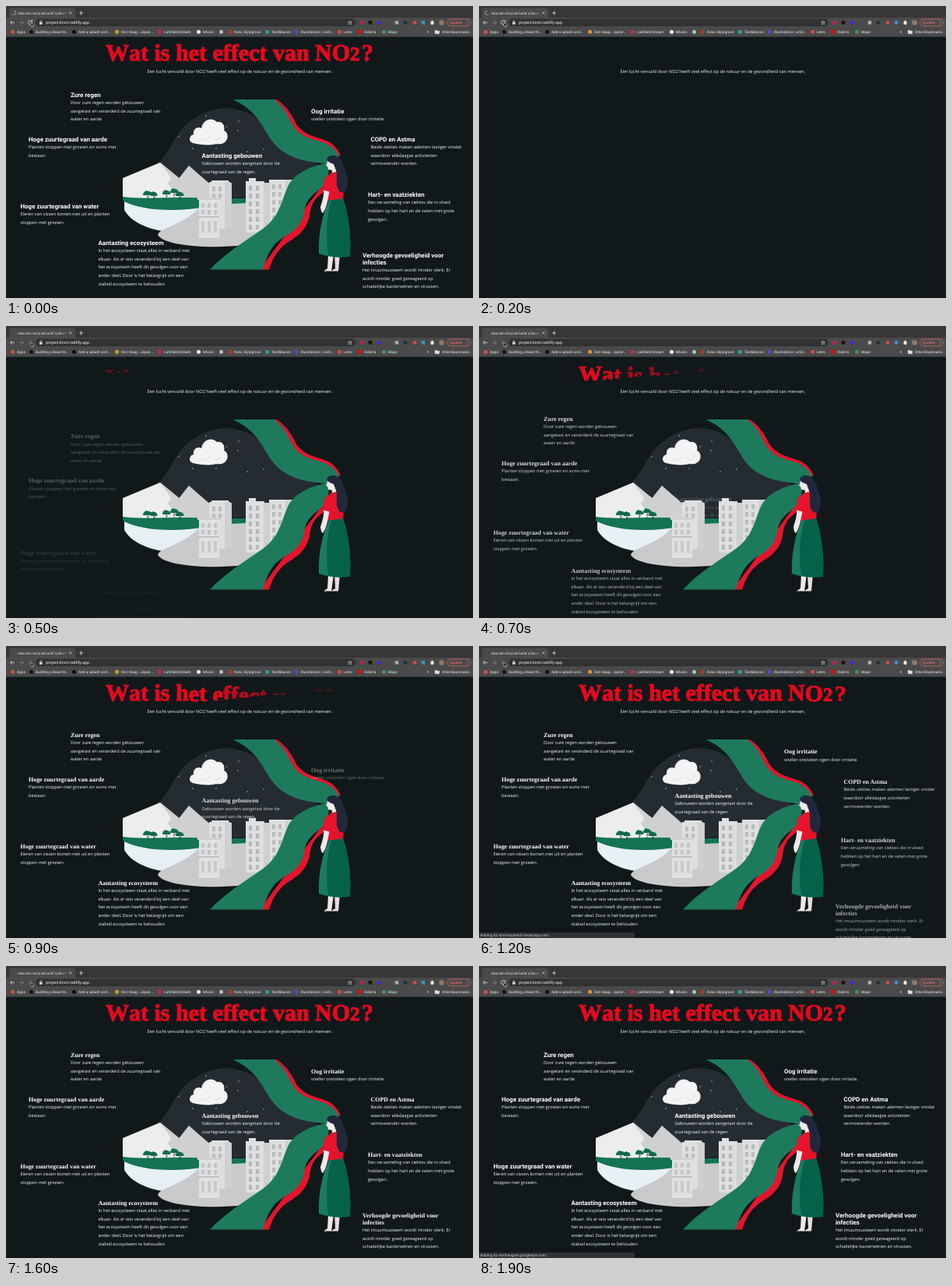
These frames come from a looping animation (600x375 px, 2 s). An HTML page with a canvas:

```html
<!DOCTYPE html>
<html lang="nl">
<head>
<meta charset="utf-8">
<title>NO2</title>
<style>
html, body { margin: 0; width: 100%; height: 100%; overflow: hidden; background: #10181a; }
canvas { display: block; width: 600px; height: 375px; }
</style>
</head>
<body>
<canvas id="stage" width="600" height="375"></canvas>
<script>
const ctx = document.getElementById('stage').getContext('2d');
const LOOP = 2000, STEP = 100;
const UI = 'Roboto, sans-serif';
const BODY = '5.68px "Open Sans", sans-serif';
const SERIF = '"Liberation Serif", serif';
const GREEN = '#1d7a5d', RED = '#e4142c', PAGE = '#10181a';

const clamp = v => Math.max(0, Math.min(1, v));

function text(s, x, y, font, color) {
  ctx.font = font;
  ctx.fillStyle = color;
  ctx.fillText(s, x, y);
}
function rect(x, y, w, h, color, r = 0) {
  ctx.fillStyle = color;
  ctx.beginPath();
  ctx.roundRect(x, y, w, h, r);
  ctx.fill();
}
function dot(x, y, r, color) {
  ctx.fillStyle = color;
  ctx.beginPath();
  ctx.arc(x, y, r, 0, Math.PI * 2);
  ctx.fill();
}
function shape(d, color) {
  ctx.fillStyle = color;
  ctx.fill(new Path2D(d));
}
function line(d, color, width = 0.8) {
  ctx.strokeStyle = color;
  ctx.lineWidth = width;
  ctx.stroke(new Path2D(d));
}

// Browser chrome

const bookmarks = [
  ['Apps', 14, '#d0533f'], ['Building a React N...', 38, '#111'], ['Add a splash scre...', 93, '#111'],
  ['Den Haag - Japan...', 148, '#d99a2b'], ['Larkfield Stream', 203, '#c42b54'], ['Mivolo', 253, '#f1f1f1'],
  ['', 282, '#bbb'], ['Kata | Bytegrove', 293, '#b1361e'], ['TestBeacon', 341, '#20a7a0'],
  ['Illustrations | unDr...', 379, '#4a4bd0'], ['Letro', 434, '#d94b3d'], ['Vidorra', 460, '#f00'],
  ['Maps', 491, '#3c9a55']
];
const extensions = [
  [457, '#c3243b'], [468, '#151515'], [479, '#3730c8'], [502, '#a8a8a8'],
  [513, '#2b3033'], [525, '#c74a50'], [536, '#3f8fc4']
];

function drawReload(loading) {
  if (loading) {
    line('M29 19l4 4M33 19l-4 4', '#777');
  } else {
    line('M33 19.5a2.6 2.6 0 1 0 .6 2M33.7 18v2h-2', '#ddd');
  }
  const hand = 'M32 21.2l.1 5.2 1.2-1 .9 1.9 1-.5-.9-1.8 1.6-.2z';
  shape(hand, '#000');
  line(hand, '#eee', 0.5);
}

function drawChrome(t) {
  rect(0, 0, 600, 16, '#373738');
  rect(4, 2.5, 85, 14, '#4a4a4b', 3);
  rect(0, 15, 600, 24.5, '#4a4a4b');
  if (t < 300) {
    ctx.strokeStyle = '#bbb';
    ctx.lineWidth = 0.8;
    ctx.beginPath();
    const a = t / 90;
    ctx.arc(10.3, 8.8, 2.4, a - 1.5, a + 2.6);
    ctx.stroke();
  }
  const fade = ctx.createLinearGradient(70, 0, 79, 0);
  fade.addColorStop(0, '#eee');
  fade.addColorStop(1, '#4a4a4b');
  text('Hoe een virus de lucht schone', 15.5, 10.6, '4.7px ' + UI, fade);
  line('M81.3 7.4l3 3M84.3 7.4l-3 3', '#ddd', 0.7);
  line('M94 9h5M96.5 6.5v5', '#ddd', 0.8);

  line('M11 21.3H5.8M8 19l-2.3 2.3L8 23.6', '#ddd');
  line('M17 21.3h5.2M20 19l2.3 2.3-2.3 2.3', '#888');
  rect(38, 16.5, 411, 9.6, '#303133', 4.8);
  rect(43, 20.6, 3.6, 3, '#ddd');
  line('M43.8 20.7v-1a1 1 0 0 1 2 0v1', '#ddd', 0.6);
  text('project-knmi.netlify.app', 51, 23.2, '5.4px ' + UI, '#f0f0f0');
  line('M442 18.8l.7 1.7 1.9.1-1.5 1.2.5 1.8-1.6-1-1.6 1 .5-1.8-1.5-1.2 1.9-.1z', '#ddd', 0.6);
  for (const [x, c] of extensions) rect(x - 2.3, 19, 4.6, 4.6, c, 1);
  dot(490.5, 21.3, 2.2, '#494d57');
  rect(545.6, 19.8, 4, 4, '#eee', 0.7);
  dot(547.6, 19.5, 1, '#eee');
  dot(559.7, 21.3, 3.4, '#8c7a6b');
  ctx.strokeStyle = '#e2665c';
  ctx.lineWidth = 0.7;
  ctx.beginPath();
  ctx.roundRect(566.5, 16.8, 30, 9, 4.5);
  ctx.stroke();
  text('Update', 570, 23.1, '5px ' + UI, '#ef7469');
  for (const y of [19.3, 21.3, 23.3]) dot(592.5, y, 0.55, '#ef7469');

  for (const [name, x, c] of bookmarks) {
    dot(x - 5.5, 33.3, 2.5, c);
    text(name, x, 35.2, '4.75px ' + UI, '#eee');
  }
  text('»', 540.5, 35, '6px ' + UI, '#eee');
  shape('M551 31h2.2l.7.8h3v4H551z', '#ddd');
  text('Other Bookmarks', 560, 35.2, '4.6px ' + UI, '#eee');
  drawReload(t >= 300 && t < 1700);
}

// Illustration

const stars = [[257, 141], [222, 168], [240, 183], [270, 183], [284, 155], [298, 160], [310, 187], [331, 184], [299, 148]];

function tree(x, y, w) {
  line(`M${x} ${y}v7M${x} ${y + 4}l2-2`, '#12372f', 0.7);
  shape(`M${x - w} ${y + 1}C${x - w} ${y - 3} ${x - 2} ${y - 6} ${x + 1} ${y - 4}` +
    `C${x + w} ${y - 4} ${x + w + 1} ${y} ${x + w} ${y + 1}Z`, '#0f6b4e');
}

function windows(x, y, cols, rows, dx, dy, w, h, color) {
  for (let r = 0; r < rows; r++)
    for (let c = 0; c < cols; c++) rect(x + c * dx, y + r * dy, w, h, color);
}

function drawTown() {
  shape('M195 294C197 284 232 281 250 256L372 250L340 300C300 314 205 312 195 294Z', '#c9cacb');

  rect(338, 223, 30, 58, '#dedfdf');
  rect(359, 223, 9, 58, '#cfd0d1');
  windows(342, 229, 2, 5, 8, 10, 4, 6, '#b9bbbd');
  rect(308, 225, 24, 66, '#dedfdf');
  rect(312, 221, 9, 5, '#dedfdf');
  rect(331, 227, 8, 64, '#cfd0d1');
  windows(312, 231, 2, 6, 9, 10, 4, 6, '#b5b7b9');

  rect(261, 226, 27, 60, '#dedfdf');
  rect(281, 227, 9, 59, '#cfd0d1');
  rect(264, 224, 22, 3, '#dedfdf');
  windows(265, 232, 2, 2, 8, 9, 4, 6, '#bbbdbf');
  rect(248, 248, 26, 50, '#e0e1e1');
  rect(246, 246, 30, 3, '#d0d1d2');
  rect(248, 270, 26, 2, '#c0c1c3');
  windows(251, 253, 3, 2, 8, 9, 4, 6, '#c2c4c6');
  windows(251, 276, 3, 1, 8, 9, 4, 15, '#c9cbcc');
}

function drawLandscape() {
  shape('M193 204C213 187 216 162 237 148C262 129 291 126 316 140C343 154 355 178 390 190L405 210L370 246L195 246Z', '#242b31');
  for (const [x, y] of stars) dot(x, y, 0.65, '#e9dcae');
  shape('M240 176C234 174 235 166 241 165C240 158 246 154 251 157C253 146 264 142 271 149C278 147 282 154 280 160C286 162 286 172 281 175C276 179 270 176 266 178C258 179 248 178 240 176Z', '#f3f3f3');
  line('M246 171C252 174 258 172 261 168M268 172C273 172 277 168 277 164', '#d6d9db', 0.9);

  shape('M212 234L235 205L266 232V247H212Z', '#cfd0d1');
  shape('M150 221L198 201L254 247H150Z', '#ededed');
  shape('M198 201L254 247H222L208 228L212 221Z', '#cfd0d1');

  shape('M152 251C180 259 222 262 258 255V287C222 296 168 290 152 262Z', '#e7f1f5');
  shape('M150 245C178 249 218 244 262 247H312V257H262C222 265 176 264 150 250Z', '#147354');
  for (const [x, y, w] of [[182, 242, 6], [190, 243, 4], [206, 241, 5], [216, 239, 5], [223, 243, 5]]) tree(x, y, w);
  drawTown();
}

function drawRibbons() {
  shape('M342 120H347C357 125 365 136 370 146C378 163 391 166 406 171C420 175 427 184 430 192L418 192C400 176 368 168 342 120Z', RED);
  shape('M291 120H344C354 126 361 138 366 148C374 166 389 170 404 174C417 178 424 185 428 193L413 203C395 200 375 200 356 187C330 170 333 138 291 120Z', GREEN);
  shape('M411 224L418 232C404 242 395 246 391 263C389 281 382 291 366 301C350 310 343 323 338 338.500H326Z', RED);
  shape('M416 201C394 205 371 213 362 232C353 252 352 270 330 286C306 303 283 316 262 338.500H330C335 321 341 306 358 296C375 287 382 276 384 261C387 244 399 240 413 226Z', GREEN);
}

function drawWoman() {
  const hair = '#23273b', skin = '#f3e8e8';
  shape('M414 319L413 337L408 340.500H418L421 319Z', skin);
  shape('M422 319L423 337L417 340.500H427L429 319Z', '#e5dcdd');
  shape('M413 197L412.500 202L411 205L413 206L414 210L419 211L418 219H425L424 205L421 198Z', skin);
  shape('M413 219C416 214 422 212 426 214C434 220 435 237 433 249L414 251C412 242 405 234 413 219Z', RED);
  shape('M412 198C413 190 424 190 429 196C434 202 434 207 436 213C441 222 440 234 435 239C428 242 424 233 425 222C426 213 422 207 421 203C418 202 415 201 412 198Z', hair);
  shape('M408 235L416 235C414 246 413 253 410 261L407 266L405 264L404 258C407 249 409 242 408 235Z', skin);
  shape('M414 250L433 247C441 268 444 301 442 322C428 324 413 322 402 318C401 292 407 268 414 250Z', '#04624a');
  shape('M414 250L418 249.500C411 272 411 300 414 321L402 318C401 292 407 268 414 250Z', GREEN);
  shape('M409 222C414 215 421 217 420 225L417 239L407 236Z', RED);
}

// Page copy

const FADE = 420;
const items = [
  { x: 83, y: 116.700, at: 430, head: ['Zure regen'], body: ['Door zure regen worden gebouwen', 'aangetast en veranderd de zuurtegraad van', 'water en aarde'] },
  { x: 29, y: 173.700, at: 430, head: ['Hoge zuurtegraad van aarde'], body: ['Planten stoppen met groeien en soms met', 'bestaan.'] },
  { x: 18.500, y: 259.800, at: 470, head: ['Hoge zuurtegraad van water'], body: ['Eieren van vissen komen niet uit en planten', 'stoppen met groeien.'] },
  { x: 118.500, y: 306.800, at: 490, head: ['Aantasting ecosysteem'], body: ['In het ecosysteem staat alles in verband met', 'elkaar. Als er iets veranderd bij een deel van', 'het ecosysteem heeft dit gevolgen voor een', 'ander deel. Door is het belangrijk om een', 'stabiel ecosysteem te behouden'] },
  { x: 251.500, y: 195, at: 645, head: ['Aantasting gebouwen'], body: ['Gebouwen worden aangetast door de', 'zuurtegraad van de regen.'] },
  { x: 392, y: 138, at: 805, head: ['Oog irritatie'], body: ['sneller onstoken ogen door irritatie.'] },
  { x: 468.500, y: 173.700, at: 900, head: ['COPD en Astma'], body: ['Beide ziektes maken ademen lastiger omdat', 'waardoor alledaagse activiteiten', 'vermoeiender worden.'] },
  { x: 465, y: 245, at: 955, head: ['Hart- en vaatziekten'], body: ['Een verzameling van ziektes die in vloed', 'hebben op het hart en de vaten met grote', 'gevolgen.'] },
  { x: 458, y: 322.500, at: 1030, head: ['Verhoogde gevoeligheid voor', 'infecties'], body: ['Het imuumsusteem wordt minder sterk. Er', 'wordt minder goed gereageerd op', 'schadelijke bacterieënen en virussen.'] }
];

function drawItem(item, t, webFont) {
  const q = webFont ? 1 : 1 - (1 - clamp((t - item.at) / FADE)) ** 2;
  if (!q) return;
  let y = item.y + 40 * (1 - q);
  ctx.globalAlpha = q;
  const font = 'bold 7.95px ' + (webFont ? UI : SERIF);
  for (const s of item.head) {
    text(s, item.x, y, font, '#fff');
    y += 9;
  }
  for (const s of item.body) {
    text(s, item.x, y + 0.4, BODY, '#f5f6f6');
    y += 10.6;
  }
  ctx.globalAlpha = 1;
}

// Letters rise and brighten one after another while being uncovered from the top.
function drawTitle(t, done) {
  const title = 'Wat is het effect van NO2?';
  let x = 128, n = 0;
  for (const ch of title) {
    ctx.font = 'bold 30px ' + SERIF;
    const width = ctx.measureText(ch).width;
    if (ch !== ' ') {
      const p = done ? 1 : clamp((t - 420 - 25 * n++) / 400);
      if (p) {
        const dy = 8 * (1 - p);
        ctx.save();
        ctx.beginPath();
        ctx.rect(x - 3, 44, width + 6, 4 + dy + 28 * p);
        ctx.clip();
        ctx.globalAlpha = Math.min(1, 1.4 * p);
        if (ch === '2') ctx.font = 'bold 25px ' + SERIF;
        ctx.fillStyle = ctx.strokeStyle = '#e5091f';
        ctx.lineWidth = 1;
        ctx.fillText(ch, x, 69.5 + dy);
        ctx.strokeText(ch, x, 69.5 + dy);
        ctx.restore();
      }
    }
    x += width;
  }
}

function drawStatus(s) {
  rect(0, 368, 200, 7, '#303234', 1);
  text(s, 1.5, 373.300, '4.75px ' + UI, '#c9cccd');
}

function draw(t) {
  const webFont = t < 100 || t >= 1700;
  rect(0, 0, 600, 375, PAGE);
  if (webFont || t >= 400) {
    drawLandscape();
    drawRibbons();
    drawWoman();
  }
  text('Een lucht vervuild door NO2 heeft veel effect op de natuur en de gezondheid van mensen.', 181.500, 85.700, BODY, '#f5f6f6');
  drawTitle(t, webFont);
  for (const item of items) drawItem(item, t, webFont);
  drawChrome(t);
  if (t >= 1100 && t < 1400) drawStatus('Waiting for knmi-backend.herokuapp.com...');
  if (t >= 1700) drawStatus('Waiting for earthengine.googleapis.com...');
}

ctx.textRendering = 'geometricPrecision';
const start = performance.now();
function frame() {
  const t = (performance.now() - start) % LOOP;
  draw(Math.floor(t / STEP) * STEP);
  requestAnimationFrame(frame);
}
frame();
</script>
</body>
</html>
```
